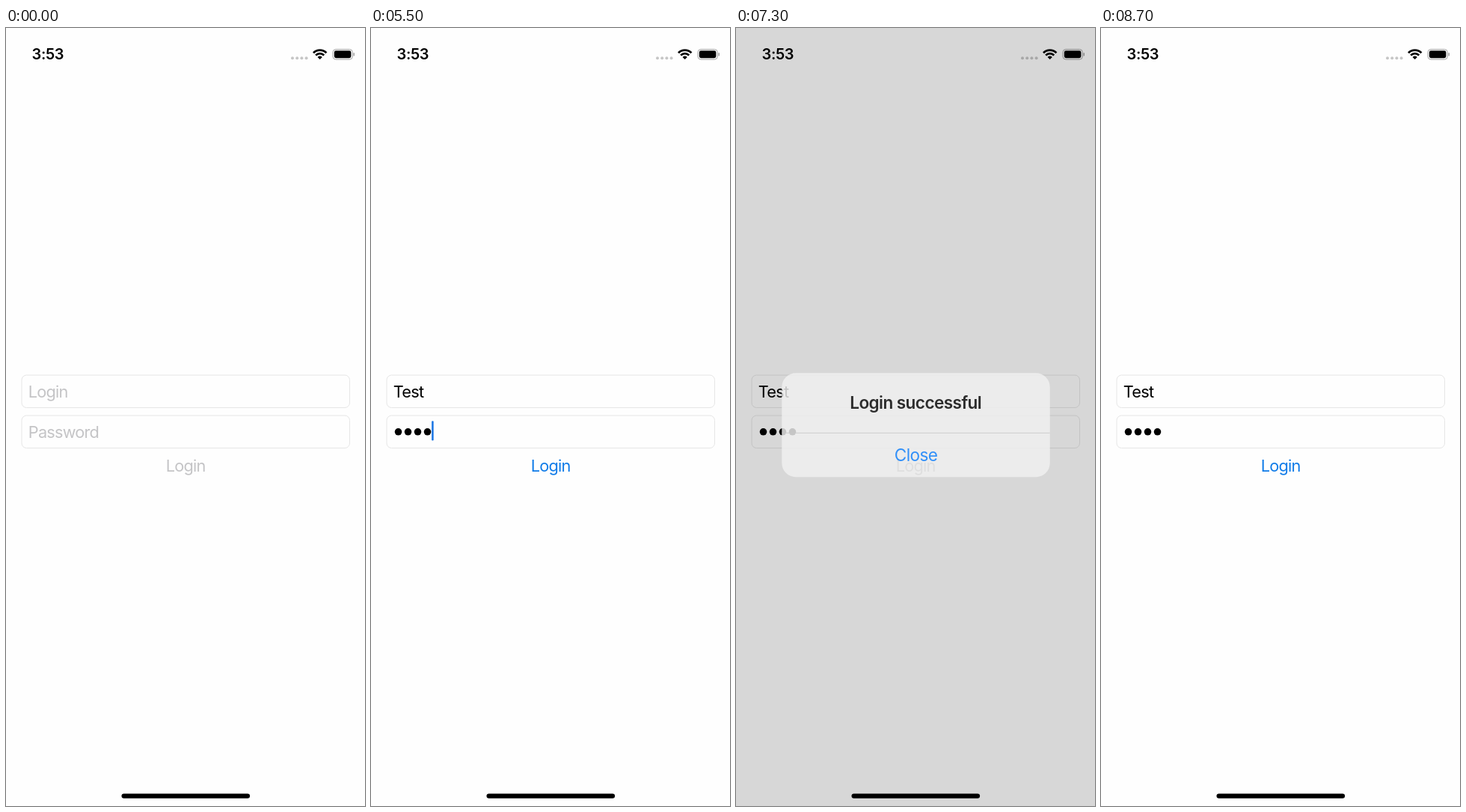
Recreate the animation shown at these times as an HTML page with a canvas. Size 480 by 1040 pixels, loop 9010 ms.

```html
<!DOCTYPE html>
<html lang="en">
<head>
<meta charset="utf-8">
<title>Login form</title>
<style>
  html, body { margin: 0; width: 100%; height: 100%; overflow: hidden; background: #fefefe; }
  canvas { display: block; width: 480px; height: 1040px; }
</style>
</head>
<body>
<canvas id="stage" width="480" height="1040"></canvas>
<script>
const ctx = document.getElementById('stage').getContext('2d');
const LOOP = 9010;
const TICK = 100;
const NAME = 'Test';
const BLUE = '#0f7be8';
const HINT = '#c4c4c6';
const DIMMED = '#a0a0a2';
const BLACK = '#000';

const clamp = x => Math.min(1, Math.max(0, x));
const smooth = x => x * x * (3 - 2 * x);
const ramp = (t, start, length) => clamp((t - start) / length);

// The name is typed in quick pairs, the password at an even pace.
const nameKey = i => 1610 + Math.floor(i / 2) * 400 + (i % 2) * 100;
const passKey = i => 4000 + i * 150;

function typed(t, key) {
  let n = 0;
  while (n < NAME.length && t >= key(n)) n++;
  return n;
}

// One-second blink: lit, fade out, dark, fade in.
function blink(t, since) {
  const phase = (t - since + 1000) % 1000;
  return 1 - ramp(phase, 500, 200) + ramp(phase, 850, 150);
}

function alertShow(t) {
  return smooth(ramp(t, 7010, 400)) - smooth(ramp(t, 8390, 225));
}

function box(x, y, w, h, r) {
  ctx.beginPath();
  ctx.roundRect(x, y, w, h, r);
}

function fillBox(x, y, w, h, r, color) {
  box(x, y, w, h, r);
  ctx.fillStyle = color;
  ctx.fill();
}

function strokeBox(x, y, w, h, r, color) {
  box(x, y, w, h, r);
  ctx.strokeStyle = color;
  ctx.lineWidth = 1;
  ctx.stroke();
}

function dot(x, y, r, color) {
  ctx.beginPath();
  ctx.arc(x, y, r, 0, Math.PI * 2);
  ctx.fillStyle = color;
  ctx.fill();
}

function label(text, x, y, color, { weight = 400, size = 21.76, spacing = -0.8, align = 'left' } = {}) {
  ctx.font = `${weight} ${size}px Inter, Roboto, sans-serif`;
  ctx.letterSpacing = spacing + 'px';
  ctx.textAlign = align;
  ctx.fillStyle = color;
  ctx.fillText(text, x, y);
}

function caret(x, y, alpha) {
  ctx.globalAlpha = alpha;
  fillBox(x - 1.3, y, 2.6, 26.2, 1.2, '#1f78e4');
  ctx.globalAlpha = 1;
}

function wifi(x, y) {
  const from = -Math.PI * 0.75, to = -Math.PI * 0.25;
  ctx.strokeStyle = ctx.fillStyle = BLACK;
  ctx.lineWidth = 2.8;
  for (const r of [12.3, 7.8]) {
    ctx.beginPath();
    ctx.arc(x, y, r, from, to);
    ctx.stroke();
  }
  ctx.beginPath();
  ctx.moveTo(x, y);
  ctx.arc(x, y, 4.4, from, to);
  ctx.fill();
}

function battery() {
  strokeBox(437, 28.5, 26.3, 13.5, 4, '#a3a3a3');
  fillBox(438.8, 30.3, 22.6, 9.9, 2.4, BLACK);
  fillBox(464.5, 33, 1.5, 4.6, 0.8, '#a3a3a3');
}

function statusBar() {
  label('3:53', 34.6, 42.4, BLACK, { weight: 600, size: 20, spacing: -0.4 });
  for (let i = 0; i < 4; i++) dot(383 + i * 6.2, 40.2, 2, '#c6c6c6');
  wifi(419.7, 42);
  battery();
}

function nameField(t) {
  strokeBox(21, 464, 438.5, 43.5, 6.5, '#e6e6e6');
  const count = typed(t, nameKey);
  const text = NAME.slice(0, count);
  label(text || 'Login', 29.8, 494, text ? BLACK : HINT);
  if (t < 1100 || t > 2950) return;
  const end = text ? 30 + ctx.measureText(text).width : 31;
  caret(end, 472.5, blink(t, count ? nameKey(count - 1) : 1200));
}

function passField(t) {
  strokeBox(21, 518, 438.5, 43.5, 6.5, '#e6e6e6');
  const count = typed(t, passKey);
  if (!count) label('Password', 29.8, 548, HINT);
  for (let i = 0; i < count; i++) dot(36.5 + i * 13, 539.8, 4.8, BLACK);
  if (t < 3100 || t > 7000) return;
  caret(30.6 + count * 12.95, 525.2, blink(t, count ? passKey(count - 1) : 3050));
}

function loginButton(t) {
  const covered = t > 7000 && t < 8500;
  const color = covered ? DIMMED : t < passKey(0) ? HINT : BLUE;
  const pressed = t >= 6300 ? 1 - ramp(t, 6550, 450) : 0;
  ctx.globalAlpha = 1 - 0.8 * pressed;
  label('Login', 240.2, 592.7, color, { align: 'center' });
  ctx.globalAlpha = 1;
}

function alertBox(t) {
  const show = alertShow(t);
  if (!show) return;
  ctx.fillStyle = `rgba(0, 0, 0, ${0.19 * show})`;
  ctx.fillRect(0, 0, 480, 1040);

  // Shrinks into place on entry, only fades on exit.
  const scale = 1.2 - 0.2 * smooth(ramp(t, 7010, 400));
  ctx.save();
  ctx.globalAlpha = show;
  ctx.translate(240.5, 530.8);
  ctx.scale(scale, scale);
  fillBox(-172.8, -67, 345.6, 134, 18, '#f2f2f2');
  ctx.fillStyle = '#c8c8c8';
  ctx.fillRect(-172.8, 9.7, 345.6, 1);
  label('Login successful', -0.3, -20.8, BLACK, { weight: 600, spacing: -0.55, align: 'center' });
  label('Close', 0, 46.9, '#067bfb', { spacing: -0.6, align: 'center' });
  ctx.restore();
}

function draw(t) {
  ctx.fillStyle = '#fefefe';
  ctx.fillRect(0, 0, 480, 1040);
  statusBar();
  nameField(t);
  passField(t);
  loginButton(t);
  alertBox(t);
  fillBox(154.5, 1023.4, 171.6, 6.4, 3.2, BLACK);
}

const start = performance.now();

function frame() {
  const t = (performance.now() - start) % LOOP;
  draw(Math.floor(t / TICK) * TICK);
  requestAnimationFrame(frame);
}

frame();
</script>
</body>
</html>
```
